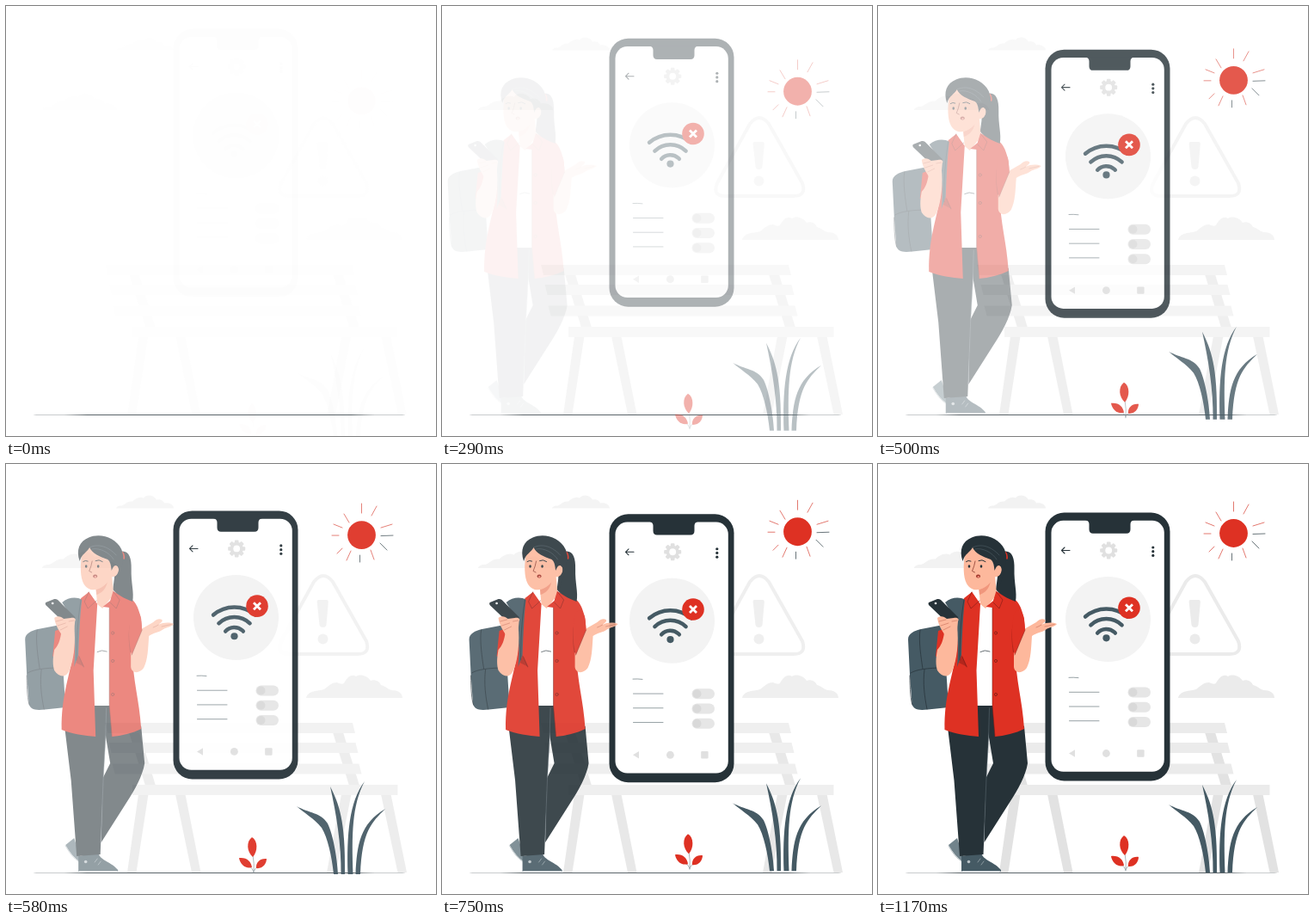
An HTML page with a canvas for the animation above (1.21 s loop, 500 by 500 pixels).

```html
<!DOCTYPE html>
<html lang="en">
<head>
<meta charset="utf-8">
<title>No connection</title>
<style>
html, body { margin: 0; width: 100%; height: 100%; overflow: hidden; background: #fff; }
canvas { display: block; width: 500px; height: 500px; }
</style>
</head>
<body>
<canvas id="stage" width="500" height="500"></canvas>
<script>
const stage = document.getElementById('stage').getContext('2d');
const buffer = document.createElement('canvas');
buffer.width = buffer.height = 500;
const g = buffer.getContext('2d');

const INK = '#263238', SLATE = '#455a64', RED = '#de3123', DEEP = '#b3261c';
const SKIN = '#fdb89c', PALE = '#ebebeb', SHADE = '#e2e2e2';
const LOOP = 1210;

function fill(color, d) {
  g.fillStyle = color;
  g.fill(new Path2D(d));
}

function line(color, width, d) {
  g.strokeStyle = color;
  g.lineWidth = width;
  g.stroke(new Path2D(d));
}

function oval(color, x, y, rx, ry = rx, turn = 0) {
  g.fillStyle = color;
  g.beginPath();
  g.ellipse(x, y, rx, ry, turn, 0, Math.PI * 2);
  g.fill();
}

function box(color, x, y, w, h, r = 0) {
  g.fillStyle = color;
  g.beginPath();
  g.roundRect(x, y, w, h, r);
  g.fill();
}

function layer(alpha, dx, dy, draw) {
  g.setTransform(1, 0, 0, 1, 0, 0);
  g.clearRect(0, 0, 500, 500);
  g.translate(dx, dy);
  g.lineCap = g.lineJoin = 'round';
  draw();
  stage.globalAlpha = Math.max(0, Math.min(1, alpha));
  stage.drawImage(buffer, 0, 0);
  stage.globalAlpha = 1;
}

// cubic-bezier(.36, -.01, .5, 1.38)
function ease(x) {
  if (x <= 0) return 0;
  if (x >= 1) return 1;
  let lo = 0, hi = 1;
  for (let i = 0; i < 30; i++) {
    const s = (lo + hi) / 2;
    if (s * (1.08 + s * (-0.66 + s * 0.58)) < x) lo = s; else hi = s;
  }
  return lo * (-0.03 + lo * (4.2 - lo * 3.17));
}

function smallCloud(x, y, k) {
  g.save();
  g.translate(x, y);
  g.scale(k, k);
  fill('#f2f2f2', 'M0 15H67C67 11 62 8 56 9C55 5 50 4 47 5C44 0 36 -2 32 3C27 1 22 4 19 7C12 6 10 12 5 12C2 12 0 14 0 15Z');
  g.restore();
}

function backdrop() {
  smallCloud(128, 36.5, 1);
  smallCloud(42, 101.5, 1.3);
  fill(PALE, 'M349 272H461C461 266 455 263 449 263C445 263 443 259 436 257C434 252 428 250 424 252C420 246 412 244 407 247C403 244 398 246 394 253C392 257 390 256 385 254C378 254 374 259 370 262C363 264 351 263 349 272Z');

  line(PALE, 4, 'M358 137Q369 123 380 137L419 206Q424 221 409 221H329Q314 221 320 206Z');
  fill(PALE, 'M363 158H373Q375 158 374.8 161L372.5 187Q372 190 368.5 190Q365 190 364.5 187L361.7 161Q361.5 158 363 158Z');
  oval(PALE, 368.5, 203.5, 6);

  for (const x of [143, 380]) fill(SHADE, `M${x} 312h12l19 62h-12Z`);
  for (const [x, dx] of [[154, -14], [197, 18], [390, -18], [436, 18.5]]) {
    fill(SHADE, `M${x} 384h11.5l${dx} 91h-10.5Z`);
  }
  [[115, 301, 288], [119.5, 324, 287], [123.5, 348.5, 287]].forEach(([x, y, w]) =>
    fill(PALE, `M${x} ${y}h${w}l3 12h${-w}Z`));
  box(PALE, 147, 373, 308.5, 12);
}

function sun() {
  oval(RED, 413.5, 80.5, 16.4);
  line('#e0695f', 0.9, 'M413.5 44V55M431 47L425 58M449 68L436 72M424 98L428 109M401 99L396 110M391 96L385 102M379 81H387M381 68L391 72M393 56L399 66');
  line('#59666b', 0.9, 'M436 81.5L450 81M435 90L443 98M411.5 104V112');
}

function plants() {
  fill(SLATE, 'M338 396C352 404 366 403 374 416C380 428 385 455 386 475H381C379 455 374 432 367 421C358 410 347 404 338 396Z');
  fill(SLATE, 'M377 373C387 393 395 412 394 475H389.5C390 440 384 405 377 373Z');
  fill(SLATE, 'M417 367C402 395 402 430 403.5 475H397.5C396 430 399 390 417 367Z');
  fill(SLATE, 'M441 399C425 415 414 425 412 475H406.5C408 440 412 416 441 399Z');
  line('#8b979c', 0.7, 'M287 452Q289 463 288 473M283 466Q287 468 288 472M293 466Q289 468 288 472');
  fill(RED, 'M286 432C293 436 293 448 287 455C280 449 279 437 286 432Z');
  fill(RED, 'M271 456C280 455 285 460 286 467C278 469 272 463 271 456Z');
  fill(RED, 'M303 457C296 456 290 461 291 468C298 469 303 463 303 457Z');
}

function wifi() {
  oval('#f3f3f3', 267.5, 180.5, 49.5);
  oval(SLATE, 265.5, 202.3, 4.1);
  g.strokeStyle = SLATE;
  g.lineWidth = 4.5;
  for (const [r, half] of [[37.5, 0.71], [26, 0.77], [14, 0.83]]) {
    g.beginPath();
    g.arc(265.5, 206, r, -Math.PI / 2 - half, -Math.PI / 2 + half);
    g.stroke();
  }
  oval(RED, 292, 167.2, 12.8);
  g.lineCap = 'butt';
  line('#fff', 2.8, 'M288 163.2l8 8M296 163.2l-8 8');
  g.lineCap = 'round';
}

function gear(x, y) {
  g.save();
  g.translate(x, y);
  for (let i = 0; i < 8; i++) {
    box('#e0e0e0', -2.3, -10, 4.6, 5, 1);
    g.rotate(Math.PI / 4);
  }
  g.restore();
  oval('#e0e0e0', x, y, 7.6);
  oval('#fff', x, y, 3.9);
}

function device() {
  box(INK, 194.5, 56.5, 145, 312, 22);
  box('#fff', 201.5, 65.8, 131.3, 292, 14);
  fill(INK, 'M241 65H298Q293.5 66 293.5 70V76Q293.5 80.7 289 80.7H250Q245.5 80.7 245.5 76V70Q245.5 66 241 65Z');

  line(INK, 1.1, 'M223 100.5H213.5M217 97L213.5 100.5L217 104');
  gear(268.2, 100.5);
  for (const y of [97, 101.7, 106.4]) oval(INK, 319.8, y, 1.6);

  wifi();

  line('#7d898e', 0.8, 'M222 248.3Q227 247.9 233 248.6');
  [265.3, 282, 298.7].forEach((y, i) => {
    line('#7d898e', 0.8, `M222.5 ${y}H257`);
    const cy = 265.5 + i * 17.3;
    box('#e6e6e6', 290.5, cy - 6, 26.5, 12, 6);
    oval('#d9d9d9', 296.5, cy, 5);
  });

  fill('#e0e0e0', 'M222 336.5L229 332.3V340.7Z');
  oval('#e0e0e0', 265.4, 336.5, 4.4);
  box('#e0e0e0', 301.2, 332.3, 8.4, 8.4, 1);
}

function backpack() {
  fill(SLATE, 'M35 204C35 197 42 194 50 192L76 187L82 283L58 285.5C46 287 41 285 39.5 279L37 245Z');
  line(INK, 0.7, 'M38 243C44 239 58 237 76 237M37 246C37 262 38 275 40 280M49 193C47 205 50 225 52 238M54 239C52 255 54 270 57 285');
}

function legs() {
  fill('#71838b', 'M82 443L92 435L99 456V463Q89 456 82 443Z');
  line('#b9c2c6', 1, 'M82 444Q89 457 97 462');
  fill(SLATE, 'M97 456L120 452C122 461 136 463 143 472V474H97Z');
  line('#cfd6d9', 1, 'M98 473.6H142');
  oval('#b9c2c6', 105.5, 462.5, 1.8);
  line('#a7b2b7', 0.7, 'M119 459L116 463M123 462L120 466');
  fill(INK, 'M126 281H134L170 305L174 348C172 362 162 380 154 392L123.5 440L125 366L134 348L129 318Z');
  fill(INK, 'M115 279H131L128.5 320L126 365L122.5 454L95 456L88.5 368L81 306Z');
  line('#64737a', 0.5, 'M129.5 284L128.5 320L126 365L123 440');
}

function torso() {
  fill('#fff', 'M115 160H136V281H115Z');
  line(INK, 0.7, 'M119 218.5Q124 215.5 130 218');
  fill(RED, 'M109 149L100 156C94 170 94 190 91 220C86 250 77 270 77.5 309C90 314 104 316 117 317L114.5 240L119 163Z');
  fill(RED, 'M137 148L158 157C166 161 171 178 171 195L160 222C160 250 168 275 170 308C160 313 147 316 136 317L133 281V165Z');
  fill(DEEP, 'M163 174C155 183 154 198 157 219L161 220C159 204 160 188 163 174Z');
  fill(DEEP, 'M97 222L104 236L94 231Z');
  line('#7e1c16', 0.6, 'M133 165V281L136 317M98 224L103 236');
  for (const y of [196.5, 229, 268]) {
    g.strokeStyle = '#7e1c16';
    g.lineWidth = 0.8;
    g.beginPath();
    g.arc(137, y, 1.6, 0, Math.PI * 2);
    g.stroke();
  }
}

function head() {
  fill(INK, 'M145 102C155 99 159 108 158.5 122C158 138 162 149 160 160C150 156 142 152 137 146L141 116Z');
  line(RED, 1.6, 'M148 102.5Q150.5 105 150 110');
  fill(SKIN, 'M117 142L119 163L125 168L138 152L136 130Z');
  fill('#f0967c', 'M117.5 146C125 144 129 140 131 136C129 146 124 150 118 152Z');
  fill(SKIN, 'M101 105C99 118 99 131 103 139C107 146 114 148 120 145C127 142 132 137 136 131C143 133 147 121 141 118L135 118L128 96H107Z');
  fill(INK, 'M98.5 113C94 100 98 90 109 85.5C122 80 140 85 147 99C151 108 148 125 140 146L139 131C144 129 146 119 141 118C138 117.5 137 121 135.5 124C135 118 134 113 131 111C122 108 113 104 110 97C107 103 101 104 98.5 113Z');
  line('#56676f', 0.5, 'M110 97C120 92 132 96 141 106M113 99C122 97 133 103 138 111');
  line(INK, 1, 'M102.5 113.5Q105 111.5 108 113M117 112.5Q121 110.5 125 113.5');
  oval(INK, 106, 119, 1.3, 1.7);
  oval(INK, 120, 119, 1.3, 1.7);
  line('#8d3d30', 0.8, 'M113 113Q112 119 109.5 124.5L112.5 126');
  oval('#9c3328', 116.5, 130.5, 2.5, 2.1);
  oval('#f58d7c', 116.7, 131, 1.3, 1);
  fill(RED, 'M109 148.5L103 160L108 168L119 163Z');
  fill(RED, 'M137.5 147.5L145 158L141 168L125.5 166L134 159Z');
  line('#7e1c16', 0.6, 'M109 149L104 160L108 168L118 159M138 149L145 158L141 168L134 161');
}

function arms() {
  fill(SLATE, 'M78 161C85 155 95 154 101 158C99 176 98 195 97 222L92 236C94 215 93 190 85 172Z');
  line(INK, 0.6, 'M100 158C96 180 95 205 95 228');

  fill(RED, 'M70 194L81 190L82 216L67 224Z');
  fill(SKIN, 'M77 196L92 189C94 205 92 228 86 241C82 249 74 248 69 240C67 234 67 226 69 216C73 212 76 205 77 196Z');
  fill(INK, 'M59 161L69 157Q71 156.5 73 158L93 178Q94 180 92 181L84 185Q82 186 80 184L59 164Q58 162 59 161Z');
  oval('#fff', 67, 162, 1.3);
  fill(SKIN, 'M69 179C72 176 77 177 80 180L88 179C92 178 95 180 93 183L92 194L80 202C76 196 70 188 69 179Z');
  line('#c8705a', 0.6, 'M71 183L79 181M73 188L82 185M76 193L84 189M86 183L92 182');

  fill(SKIN, 'M170 192L184 184C187 181 191 179 194 181C196 183 192 185 190 187C196 184 203 184 208 186C206 189 199 190 196 192C191 196 184 196 179 200C178 214 178 227 173 237C168 244 159 244 158 236L158 220Z');
  line('#c8705a', 0.6, 'M190 187Q187 189 184 190M194 189L205 186.5');
  fill(RED, 'M158 175C162 166 168 170 170 180L171 193L159 222C155 207 155 190 158 175Z');
  line('#7e1c16', 0.5, 'M171 193L159 222');
}

function person() {
  backpack();
  legs();
  torso();
  head();
  arms();
}

function draw(ms) {
  // 24 pictures a second, on a 10 ms clock, after a short hold
  let step = -1;
  while (Math.floor(13 + (step + 1) * 25 / 6) * 10 <= ms) step++;
  const t = step < 0 ? 0.03 : (step + 3.8) / 24;
  const first = ease(t), late = ease(t - 0.2);
  const drop = 30 * (1 - first);

  stage.fillStyle = '#fff';
  stage.fillRect(0, 0, 500, 500);
  layer(t, 0, 0, backdrop);
  layer(1, 0, 0, () => oval(INK, 248, 475.4, 217, 0.4));
  layer(first, 0, drop, sun);
  layer(first, 0, drop, plants);
  layer(first, 0, -drop, device);
  layer(late, -30 * (1 - late), 0, person);
}

const start = performance.now();
function tick() {
  draw((performance.now() - start) % LOOP);
  requestAnimationFrame(tick);
}
tick();
</script>
</body>
</html>
```
